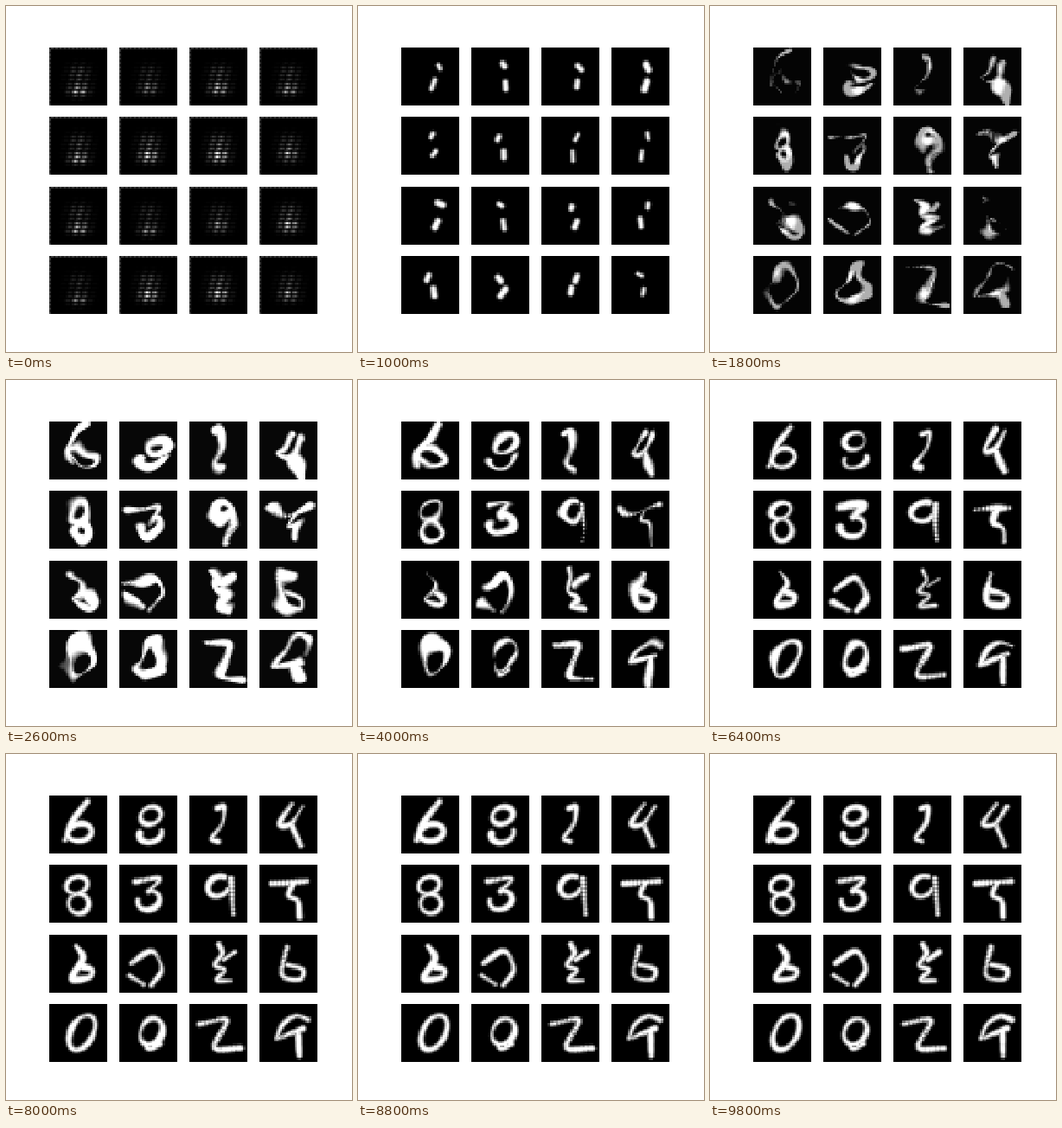
These frames come from a looping animation (400 by 400 pixels, 10000 ms). A matplotlib script:

```python
import numpy as np
import matplotlib.pyplot as plt
from matplotlib.animation import FuncAnimation

FRAMES, INTERVAL = 50, 200
N, SIDE = 28, 67          # pixels per tile, drawing units per tile
SOFT = 3.6                # width of a stroke's soft edge
BLOBS, SMEARS = 5, 13     # frames where blobs and thick smears peak

J, I = np.meshgrid(np.arange(N), np.arange(N))
X, Y = (J + 0.5) * SIDE / N, (I + 0.5) * SIDE / N


def curve(*xy):
    """Catmull-Rom curve through a few points."""
    pts = np.array(xy, float).reshape(-1, 2)
    p = np.vstack([2 * pts[0] - pts[1], pts, 2 * pts[-1] - pts[-2]])
    t = np.linspace(0, 1, 10)[:, None]
    return np.vstack([
        b + ((c - a) * t + (2 * a - 5 * b + 4 * c - d) * t**2
             + (3 * b - a - 3 * c + d) * t**3) / 2
        for a, b, c, d in zip(p, p[1:], p[2:], p[3:])])


def ring(cx, cy, rx, ry, start=0, sweep=360, lean=0.2):
    """Slanted elliptic arc, angles in degrees."""
    a = np.radians(start + np.linspace(0, sweep, 50))
    rise = ry * np.sin(a)
    return np.column_stack([cx + rx * np.cos(a) + lean * rise, cy - rise])


def distance(pts, x=X, y=Y):
    return np.hypot(x[..., None] - pts[:, 0], y[..., None] - pts[:, 1]).min(axis=2)


def ink(field):
    return np.clip(0.5 - field / SOFT, 0, 1)


def ease(t):
    t = np.clip(t, 0, 1)
    return t * t * (3 - 2 * t)


class Tile:
    """One sample: a lattice, then two blobs, then a digit that settles."""

    def __init__(self, seed, strokes):
        rng = np.random.default_rng(seed)
        self.pts = np.vstack(strokes)
        self.waves = rng.uniform(-1, 1, (3, 3, 4))
        self.raw = self.lattice(rng.uniform(0.45, 0.95), rng.uniform(17, 21))

        top = rng.uniform([30, 18], [44, 25])
        low = rng.uniform([33, 36], [43, 41])
        self.blobs = np.minimum(
            distance(curve(*top, *(top + rng.uniform([-4, 2], [6, 7])))),
            distance(curve(*low, *(low + rng.uniform([-7, 4], [2, 11]))))) - rng.uniform(2, 4)

    @staticmethod
    def lattice(gain, spot):
        haze = np.exp(-((J - 14) / 5) ** 2 - ((I - 15) / 7.5) ** 4)
        glow = np.exp(-((J - 13.5) / 4) ** 2 - ((I - spot) / 2.6) ** 2)
        rows = 0.2 + 0.8 * (I % 2) * (0.7 + 0.3 * (I % 4 == 1))
        cols = 0.6 + 0.4 * np.cos(np.pi / 2 * (J + I // 4 - 1))
        border = 0.12 * ((I == 0) | (J == 0)) * (1 + (I + J) % 2)
        return np.clip(gain * rows * cols * (0.5 * haze + glow) + border, 0, 1)

    def noise(self, n, frame):
        """Smooth field of three waves that drifts with the frame."""
        return sum(np.sin(0.14 * (u * X + v * Y) + 3 * phase + 0.25 * rate * frame)
                   for u, v, phase, rate in self.waves[n]) / 1.5

    def draw(self, frame):
        if frame <= BLOBS:
            t = frame / BLOBS
            return (1 - t) * self.raw + t * ink(self.blobs)
        young = 1 - frame / (FRAMES - 1)
        swell = np.exp(-((frame - SMEARS) / 5) ** 2)
        warp = 9 * young**2
        field = distance(self.pts, X + warp * self.noise(0, frame), Y + warp * self.noise(1, frame))
        field -= 2.9 + 1.8 * swell + (0.5 + 2 * young) * self.noise(2, frame)
        t = ease((frame - BLOBS) / 6)
        field = (1 - t) * np.clip(self.blobs, -3, 6) + t * np.clip(field, -3, 6)
        return np.maximum(ink(field), 0.03 * swell)


digits = [
    [curve(44, 7, 24, 34, 18, 52), ring(35, 43, 14, 10)],
    [ring(36, 23, 12, 10), ring(36, 44, 13, 11, 180, 200)],
    [curve(32, 15, 40, 14, 38, 32, 26, 49, 33, 53)],
    [curve(38, 10, 23, 32, 36, 33, 50, 13), curve(37, 33, 48, 58)],
]
digits += [
    [ring(32, 24, 12, 10), ring(34, 45, 12, 11, lean=0)],
    [curve(19, 19, 46, 16, 34, 31), ring(34, 41, 13, 11, 100, -280)],
    [ring(34, 25, 12, 12, 70, 270), curve(48, 16, 51, 57)],
    [curve(14, 22, 55, 19), curve(39, 21, 34, 35, 44, 42, 46, 60)],
]
digits += [
    [curve(31, 13, 39, 28, 26, 50, 46, 50, 50, 41, 39, 37)],
    [curve(14, 33, 38, 19, 49, 40, 37, 58), curve(12, 47, 28, 57)],
    [curve(34, 11, 38, 22, 30, 35, 41, 41, 32, 52, 48, 53), curve(40, 29, 53, 20)],
    [curve(32, 14, 26, 46, 46, 52, 50, 40, 32, 35)],
]
digits += [
    [ring(38, 33, 14, 20, lean=0.3)],
    [ring(37, 32, 13, 15), curve(29, 45, 35, 52, 46, 46)],
    [curve(12, 23, 43, 19, 29, 50, 59, 51)],
    [curve(20, 40, 27, 24, 42, 14, 56, 18), curve(24, 39, 50, 28), curve(45, 33, 46, 60)],
]

tiles = [Tile(seed, strokes) for seed, strokes in enumerate(digits)]
fig, axes = plt.subplots(4, 4, figsize=(4, 4), dpi=100)
images = []
for ax, tile in zip(axes.flat, tiles):
    ax.axis("off")
    images.append(ax.imshow(tile.raw, cmap="gray", vmin=0, vmax=1, interpolation="nearest"))


def update(frame):
    for image, tile in zip(images, tiles):
        image.set_data(tile.draw(frame))
    return images


anim = FuncAnimation(fig, update, frames=FRAMES, interval=INTERVAL, repeat=True, repeat_delay=0)
plt.show()
```
